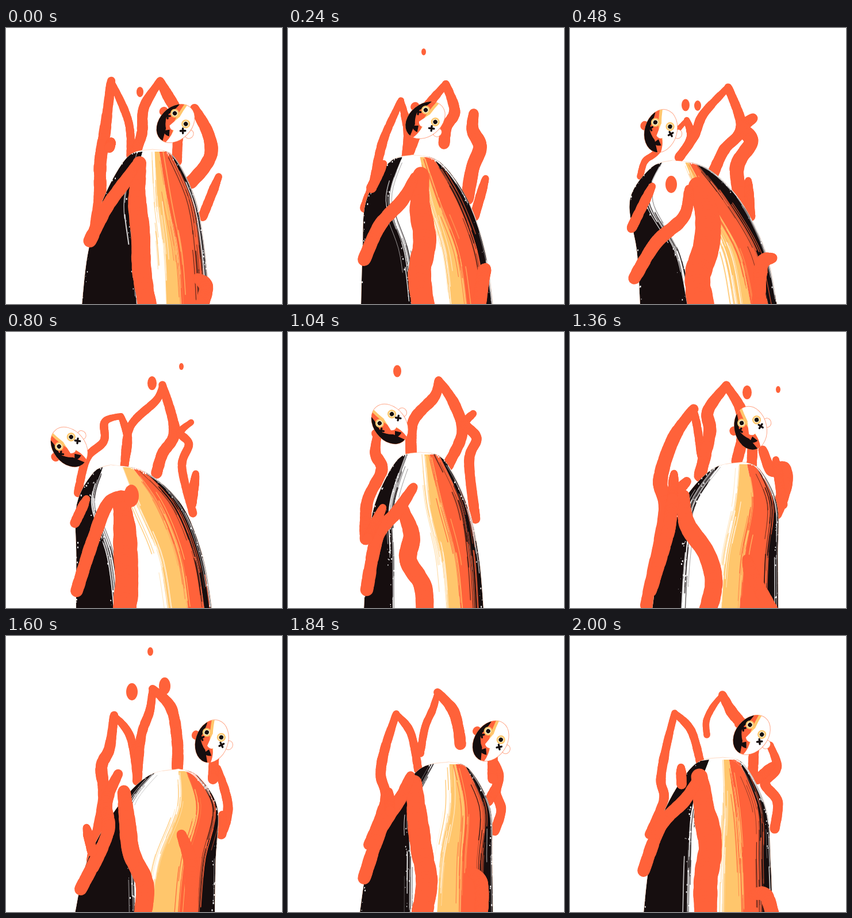
An HTML page with a canvas that plays this animation: 480 by 480 pixels, repeating every 2080 ms.

```html
<!DOCTYPE html>
<html lang="en">
<head>
<meta charset="utf-8">
<title>Burning robe</title>
<style>
html, body { margin: 0; width: 100%; height: 100%; overflow: hidden; background: #fff; }
canvas { display: block; width: 480px; height: 480px; }
</style>
</head>
<body>
<canvas id="stage" width="480" height="480"></canvas>
<script>
const ctx = document.getElementById('stage').getContext('2d');
const LOOP = 2080, STEP = 80;
const ORANGE = '#ff623a', YELLOW = '#ffc66c', BLACK = '#160e0f', WHITE = '#fff';
const STRIPES = [BLACK, WHITE, YELLOW, ORANGE, BLACK];

// Key poses: each part holds one row per time.
const TIMES = [0, 480, 800, 1040, 1360, 1600, 2000];

// Robe: apex x, y, then x of the six stripe borders at mid height and at the hem.
const robe = [
  [255, 211, 168, 216, 263, 281, 322, 330, 132, 228, 278, 305, 342, 353],
  [178, 230, 104, 138, 228, 243, 270, 296, 122, 205, 290, 315, 345, 360],
  [182, 231, 123, 152, 228, 265, 292, 305, 122, 192, 282, 315, 345, 358],
  [230, 209, 151, 181, 246, 267, 302, 312, 132, 182, 275, 300, 324, 340],
  [300, 226, 193, 215, 288, 318, 351, 360, 143, 195, 262, 295, 340, 362],
  [300, 231, 192, 214, 300, 332, 362, 368, 120, 222, 252, 300, 335, 363],
  [266, 211, 166, 213, 270, 290, 327, 341, 128, 205, 264, 300, 332, 352]
];

// Flames: brush widths and paths (x, y, ...), tip first.
const leftTower = {
  w: [21, 11, 14, 20, 24, 20, 16],
  p: [[183, 92, 172, 180, 164, 235, 163, 300, 152, 368],
      [203, 160, 175, 190, 148, 218, 130, 232, 122, 258],
      [200, 146, 172, 156, 170, 190, 140, 220, 125, 280],
      [155, 180, 152, 212, 163, 240, 138, 295, 135, 360],
      [215, 134, 180, 185, 157, 258, 166, 315, 134, 475],
      [188, 138, 180, 195, 166, 228, 170, 285, 150, 390],
      [182, 134, 167, 195, 158, 250, 163, 285, 138, 345]]
};
const leftLeg = {
  w: 14, tip: leftTower,
  p: [[213, 163, 217, 225], [210, 190, 190, 226], [212, 185, 206, 232], [152, 210, 163, 240],
      [222, 170, 228, 215], [216, 175, 228, 245], [211, 165, 228, 225]]
};
const peakLeft = {
  w: [18, 16, 14, 19, 21, 16, 11],
  p: [[268, 92, 240, 138, 236, 185, 220, 228], [275, 103, 232, 150, 216, 188, 190, 225],
      [272, 92, 262, 118, 216, 165, 206, 232], [262, 84, 255, 112, 218, 155, 214, 212],
      [272, 93, 240, 137, 243, 175, 226, 250], [255, 92, 250, 130, 235, 175, 228, 252],
      [265, 102, 248, 124, 237, 148, 238, 172]]
};
const peakRight = {
  w: 19, tip: peakLeft,
  p: [[280, 115, 290, 132, 300, 148], [298, 173, 268, 212, 248, 255],
      [293, 172, 272, 212, 262, 245], [289, 125, 303, 175, 278, 232],
      [297, 135, 300, 180, 290, 225], [287, 125, 298, 185, 298, 230],
      [280, 130, 292, 145, 305, 160]]
};
const rightTower = {
  w: [22, 24, 14, 17, 22, 16, 17],
  p: [[328, 140, 350, 180, 357, 215, 345, 242, 322, 268],
      [318, 157, 300, 174, 315, 198, 290, 245, 305, 325],
      [322, 157, 303, 175, 318, 195, 306, 235, 325, 315],
      [322, 142, 308, 160, 328, 185, 315, 225, 326, 325],
      [335, 205, 350, 240, 372, 237, 375, 268, 358, 315],
      [368, 230, 378, 260, 386, 295, 382, 325, 374, 345],
      [348, 190, 360, 228, 339, 256, 361, 288, 356, 335]]
};
const rightLick = {
  w: 16,
  p: [[370, 258, 342, 328], [310, 265, 314, 328], [330, 246, 323, 300], [322, 290, 325, 320],
      [358, 222, 370, 300], [376, 310, 375, 345], [352, 225, 325, 250]]
};
const arm = {
  w: 22,
  p: [[226, 238, 205, 270, 175, 312, 146, 370], [207, 280, 198, 328, 150, 373, 112, 435],
      [218, 285, 180, 295, 152, 360, 123, 450], [218, 270, 190, 312, 156, 355, 137, 448],
      [203, 260, 180, 290, 170, 350, 140, 450], [195, 240, 174, 290, 176, 345, 130, 440],
      [225, 245, 200, 285, 158, 330, 128, 408]]
};
const smallArm = {
  w: 17,
  p: [[183, 197, 180, 208], [143, 275, 107, 348], [140, 290, 120, 332], [165, 305, 138, 360],
      [181, 246, 178, 290], [140, 333, 150, 375], [193, 228, 194, 258]]
};
const hem = {
  w: 23,
  p: [[333, 435, 348, 450, 340, 484], [352, 400, 333, 412, 328, 484],
      [330, 500, 330, 505, 330, 510], [330, 500, 330, 505, 330, 510],
      [308, 395, 318, 425, 350, 484], [305, 345, 322, 400, 322, 484],
      [318, 450, 340, 450, 352, 484]]
};
// Centre strand: top x, y, then x at even steps down to the hem.
const strand = [
  [232, 235, 228, 234, 236, 246], [222, 275, 239, 237, 222, 228], [200, 290, 206, 208, 210, 206],
  [200, 310, 215, 209, 234, 238], [197, 285, 204, 237, 250, 240], [205, 270, 211, 218, 241, 238],
  [225, 245, 234, 244, 236, 236]
];
const strandWidth = [32, 44, 40, 30, 30, 30, 40];

// Head: time, x, y, tilt in degrees.
const head = [
  [0, 295, 166, 44], [480, 158, 179, 16], [560, 118, 192, -12], [720, 104, 200, -36],
  [800, 110, 200, -38], [1040, 177, 160, -37], [1360, 314, 167, -12], [1600, 358, 183, 19],
  [1680, 366, 186, 27], [2000, 316, 172, 39]
];

// Sparks: time, x, y, radius. Blots are the same, on the robe.
const sparks = [
  [160, 233, 76, 6], [320, 236, 24, 4], [480, 201, 134, 7], [480, 222, 135, 6],
  [800, 254, 89, 8], [800, 305, 60, 4], [1040, 190, 68, 7], [1360, 308, 105, 8],
  [1360, 362, 100, 4], [1600, 219, 97, 10], [1600, 276, 87, 10], [1600, 251, 27, 5]
];
const blots = [[480, 176, 272, 10], [800, 218, 285, 13]];

let seed = 1;
function rnd() {
  seed = (seed * 16807) % 2147483647;
  return seed / 2147483647;
}
const mix = (a, b, u) => a + (b - a) * u;

function poseAt(t) {
  let i = TIMES.length - 1;
  while (TIMES[i] > t) i--;
  const j = (i + 1) % TIMES.length;
  return { i, j, u: (t - TIMES[i]) / ((TIMES[j] || LOOP) - TIMES[i]), t };
}

const blend = (rows, { i, j, u }) => rows[i].map((v, n) => mix(v, rows[j][n], u));
const blendOne = (w, { i, j, u }) => w.length ? mix(w[i], w[j], u) : w;

// Smooth cyclic track through unevenly spaced keys.
function track(keys, t) {
  const n = keys.length;
  const key = k => keys[(k + n) % n];
  const time = k => key(k)[0] + Math.floor(k / n) * LOOP;
  let i = n - 1;
  while (keys[i][0] > t) i--;
  const d = time(i + 1) - time(i), u = (t - time(i)) / d, v = 1 - u;
  const slope = (k, c) => {
    const a = time(k) - time(k - 1), b = time(k + 1) - time(k);
    return ((key(k)[c] - key(k - 1)[c]) / a * b + (key(k + 1)[c] - key(k)[c]) / b * a) / (a + b);
  };
  return [1, 2, 3].map(c =>
    key(i)[c] * v * v * (1 + 2 * u) + key(i + 1)[c] * u * u * (3 - 2 * u)
      + d * (slope(i, c) * u * v * v - slope(i + 1, c) * u * u * v));
}

// Point on the spline through a flat point list, u in 0..1.
function along(pts, u) {
  const last = pts.length / 2 - 1;
  const k = Math.min(Math.floor(u * last), last - 1), f = u * last - k;
  return [0, 1].map(c => {
    const at = m => pts[Math.max(0, Math.min(last, m)) * 2 + c];
    const a = at(k - 1), b = at(k), d = at(k + 1), e = at(k + 2);
    return b + f * (d - a + f * (2 * a - 5 * b + 4 * d - e + f * (3 * (b - d) + e - a))) / 2;
  });
}

function sample(pts, from = 0, to = 1, n = 24) {
  return Array.from({ length: n + 1 }, (_, k) => along(pts, mix(from, to, k / n)));
}

function trace(list) {
  ctx.beginPath();
  list.forEach(([x, y]) => ctx.lineTo(x, y));
}

function brush(pts, w, { u, t }) {
  const sway = 16 * u * (1 - u);
  const bent = pts.map((v, k) => k % 2 ? v : v + sway * Math.sin(pts[k + 1] / 22 + t / 90));
  const n = 40, line = sample(bent, 0, 1, n);
  ctx.strokeStyle = ORANGE;
  for (let k = 0; k < n; k++) {
    ctx.lineWidth = w * (0.72 + 0.3 * Math.min(1, k * 3 / n)) * (0.95 + 0.1 * rnd());
    trace([line[k], line[k + 1]]);
    ctx.stroke();
  }
}

function flame({ w, p, tip }, pose) {
  const start = tip ? blend(tip.p, pose).slice(0, 2) : [];
  brush([...start, ...blend(p, pose)], blendOne(w, pose), pose);
}

function drawStrand(pose) {
  const [x, y, ...rest] = blend(strand, pose);
  const pts = rest.flatMap((v, k) => [v, mix(y, 484, (k + 1) / rest.length)]);
  brush([x, y, ...pts], blendOne(strandWidth, pose), pose);
}

function drawNeck(pose) {
  const [x, y] = track(head, pose.t);
  if (x > 250) brush([x + 5, y, x + 2, y + 66], 17, pose);
}

// Dry bristle marks running beside a border.
function bristles(pts, color, reach, count) {
  ctx.strokeStyle = color;
  for (let k = 0; k < count; k++) {
    const from = rnd() * 0.8, to = Math.min(1, from + 0.12 + rnd() * 0.4);
    const off = reach * rnd() * rnd();
    ctx.globalAlpha = 0.35 + rnd() * 0.5;
    ctx.lineWidth = 0.5 + rnd() * 1.6;
    trace(sample(pts, from, to, 8).map(([x, y]) => [x + off, y]));
    ctx.stroke();
  }
  ctx.globalAlpha = 1;
}

function specks(pts, spread, count) {
  ctx.fillStyle = WHITE;
  for (let k = 0; k < count; k++) {
    const [x, y] = along(pts, 0.15 + rnd() * 0.85);
    const s = 0.5 + rnd() * 1.5;
    ctx.fillRect(x + (rnd() - 0.5) * spread, y, s, s * 1.6);
  }
}

function robeEdges(pose) {
  const [ax, ay, ...xs] = blend(robe, pose);
  return STRIPES.concat(0).map((_, k) => {
    const mid = xs[k], low = xs[k + 6], outer = k % 5 === 0;
    const top = outer ? [ax, ay, mix(ax, mid, 0.5), ay + 13] : [mix(ax, mid, 0.45), ay + 4];
    return [...top, mid, 300, mix(mid, low, 0.7), 390, low, 482];
  });
}

function drawRobe(pose) {
  const edges = robeEdges(pose);
  ctx.save();
  trace([...sample(edges[0]).reverse(), ...sample(edges[5])]);
  ctx.fillStyle = WHITE;
  ctx.fill();
  ctx.strokeStyle = 'rgba(255,170,120,.45)';
  ctx.lineWidth = 1;
  ctx.stroke();
  ctx.clip();
  STRIPES.forEach((color, k) => {
    const left = sample(edges[k], k ? 0 : 0.2);
    const right = sample(edges[k + 1], k === 4 ? 0.1 : 0);
    trace([...left, ...right.reverse()]);
    ctx.fillStyle = color;
    ctx.fill();
  });
  for (let k = 1; k < 5; k++) {
    bristles(edges[k], STRIPES[k - 1], 11, 9);
    bristles(edges[k], STRIPES[k], -12, 9);
  }
  bristles(edges[5], WHITE, -10, 8);
  specks(edges[0], 6, 25);
  specks(edges[1], 18, 45);
  specks(edges[5], 12, 50);
  ctx.restore();
}

function oval(x, y, rx, ry, color) {
  ctx.beginPath();
  ctx.ellipse(x, y, rx, ry, 0, 0, 7);
  ctx.fillStyle = color;
  ctx.fill();
}

function shape(path, color) {
  ctx.fillStyle = color;
  ctx.fill(new Path2D(path));
}

function cross(x, y) {
  ctx.strokeStyle = BLACK;
  ctx.lineWidth = 3.4;
  ctx.stroke(new Path2D(`M${x - 3} ${y - 3}l6 6m0 -6l-6 6`));
}

function drawHead(t) {
  const [x, y, tilt] = track(head, t);
  ctx.save();
  ctx.translate(x, y);
  ctx.rotate(tilt * Math.PI / 180);
  oval(-30, -1, 7, 8, ORANGE);
  oval(30, -3, 7, 8, WHITE);
  ctx.strokeStyle = 'rgba(255,110,60,.6)';
  ctx.lineWidth = 1;
  ctx.stroke();
  oval(0, 0, 28, 38, WHITE);
  ctx.stroke();
  ctx.clip();
  shape('M-8 -40Q-4 -10 5 8Q12 26 8 40H-40V-40Z', YELLOW);
  shape('M-13 -40Q-9 -12 -2 4Q12 14 10 40H-40V-40Z', ORANGE);
  shape('M-19 -40Q-16 -16 -21 0Q-15 12 -6 18L6 40H-40V-40Z', BLACK);
  shape('M-3 -12Q2 -16 6 -11L6 11Q1 15 -5 10Z', WHITE);
  for (const ex of [-13.3, 13.3]) {
    oval(ex, -11.7, 7.6, 7.6, YELLOW);
    oval(ex, -11.7, 5.2, 5.2, '#fff3cf');
    oval(ex, -11.7, 3.7, 3.7, BLACK);
  }
  cross(18, 0.5);
  cross(-19, 0.5);
  shape('M0 15L7.5 24Q0 28 -7 24Z', BLACK);
  ctx.restore();
}

function drawDrops(drops, t) {
  for (const [time, x, y, r] of drops) {
    const age = t - time;
    if (age >= -160 && age <= 40) oval(x, y - age * 0.22, r, r * 1.5, ORANGE);
  }
}

function draw(t) {
  const pose = poseAt(t);
  seed = 4211 + t * 37;
  ctx.fillStyle = WHITE;
  ctx.fillRect(0, 0, 480, 480);
  ctx.lineCap = ctx.lineJoin = 'round';
  for (const part of [leftTower, leftLeg, peakLeft, peakRight, rightTower, rightLick]) flame(part, pose);
  drawNeck(pose);
  drawRobe(pose);
  drawStrand(pose);
  for (const part of [arm, smallArm, hem]) flame(part, pose);
  drawDrops(blots, t);
  drawDrops(sparks, t);
  drawHead(t);
}

const start = performance.now();
let shown = -1;
function tick() {
  const t = Math.floor(((performance.now() - start) % LOOP) / STEP) * STEP;
  if (t !== shown) draw(shown = t);
  requestAnimationFrame(tick);
}
tick();
</script>
</body>
</html>
```
